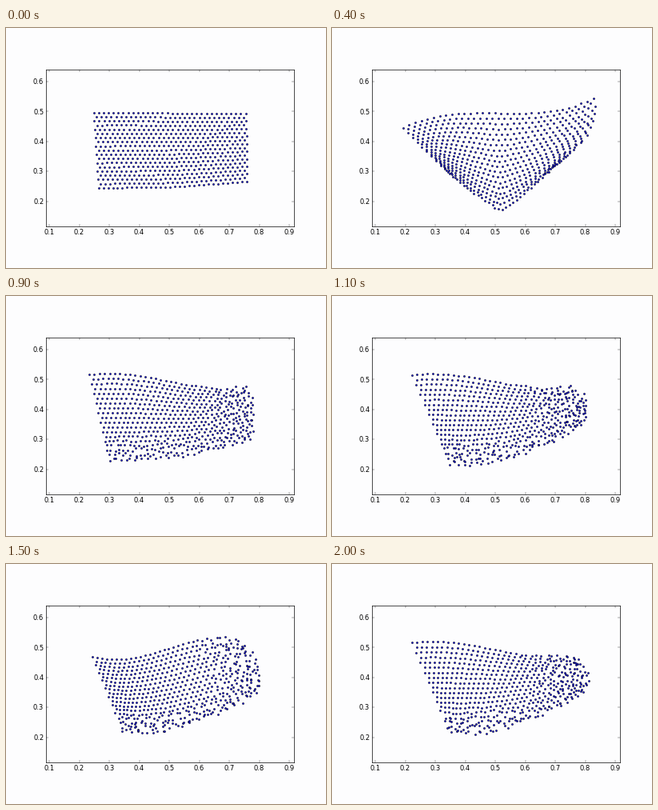
Recreate the animation shown at these times as a matplotlib script. Size 400 by 300 pixels, loop 2.1 s.

```python
import numpy as np
import matplotlib.pyplot as plt
from matplotlib.animation import FuncAnimation

FRAMES, STEP = 21, 100
PAPER = "#fdfdfe"
ROWS, COLS = 19, 32

plt.rcParams.update({"font.family": "DejaVu Sans", "font.size": 12,
                     "axes.linewidth": 1.0})
for axis in ("xtick", "ytick"):
    plt.rcParams.update({f"{axis}.direction": "in", f"{axis}.major.size": 4,
                         f"{axis}.major.width": 0.5, f"{axis}.major.pad": 4})

# Hexagonal packing, both coordinates from -1 to 1, y pointing down
r, c = np.mgrid[:ROWS, :COLS]
inside = c + r % 2 / 2 <= COLS - 1
X = (2 * (c + r % 2 / 2) / (COLS - 1) - 1)[inside]
Y = (2 * r / (ROWS - 1) - 1)[inside]
top, bottom, belly = (1 - Y) / 2, (1 + Y) / 2, 1 - Y ** 2

# The sheet at rest and its three ways of bending, in stage pixels
REST = np.array([206.25 + 93.75 * X + 1.75 * Y,
                 151.75 - 1.25 * X + 45.25 * Y - 2.75 * X * Y])
BEND = np.array([3 - 25 * X * Y + 9 * (X + X ** 2) * belly,
                 -20 * X ** 3 * top + (30 - 53 * abs(X) ** 1.2) * bottom])
SKEW = np.array([4 * (X - 1) * top + (10 + 22 * ((1 - X) / 2) ** 3) * bottom
                 + 12 * ((1 + X) / 2) ** 3 * belly,
                 (5 - 20 * X - 18 * X ** 2) * bottom])
WAVE = np.array([-5 * X, -14 * np.sin(2.2 * X)]) * top ** 1.5

# Points near the right and lower edges come loose
rng = np.random.default_rng(5)
phase = rng.uniform(0, 2 * np.pi, REST.shape)
reach = rng.uniform(0.3, 1.0, REST.shape)
loose = np.clip(np.maximum((X - 0.24) / 0.76, (Y - 0.36) / 0.64), 0, 1) ** 0.8


def ease(t, start, end):
    s = np.clip((t - start) / (end - start), 0, 1)
    return s * s * (3 - 2 * s)


def pulse(t, centre, width):
    return np.exp(-((t - centre) / width) ** 2)


def sheet(t):
    bend = pulse(t, 4, 2.3)
    skew = ease(t, 7, 11) - 0.4 * pulse(t, 7, 1.5)
    wave = 1.6 * pulse(t, 15, 2) - 0.6 * ease(t, 4, 7)
    shake = 4 * min(t / 11, 1) ** 1.3 * loose * reach
    return (REST + bend * BEND + skew * SKEW + wave * WAVE
            + shake * np.cos(phase + 0.25 * t))


def to_data(x, y):
    return 0.1 + (x - 54) / 375, 0.2 + (216.5 - y) / 375


fig = plt.figure(figsize=(8, 6), dpi=50, facecolor=PAPER)
ax = fig.add_axes([50 / 400, 52 / 300, 310 / 400, 196 / 300], facecolor=PAPER)
ax.tick_params(top=True, right=True)
(x0, y0), (x1, y1) = to_data(50, 248), to_data(360, 52)
ax.set_xlim(x0, x1)
ax.set_ylim(y0, y1)
ax.set_xticks(np.arange(1, 10) / 10)
ax.set_yticks(np.arange(2, 7) / 10)
dots, = ax.plot([], [], ".", ms=6, mfc="blue", mec="black", mew=0.8)


def draw(k):
    dots.set_data(*to_data(*sheet(k)))
    return dots,


anim = FuncAnimation(fig, draw, frames=FRAMES, interval=STEP, repeat=True,
                     repeat_delay=0)
plt.show()
```
